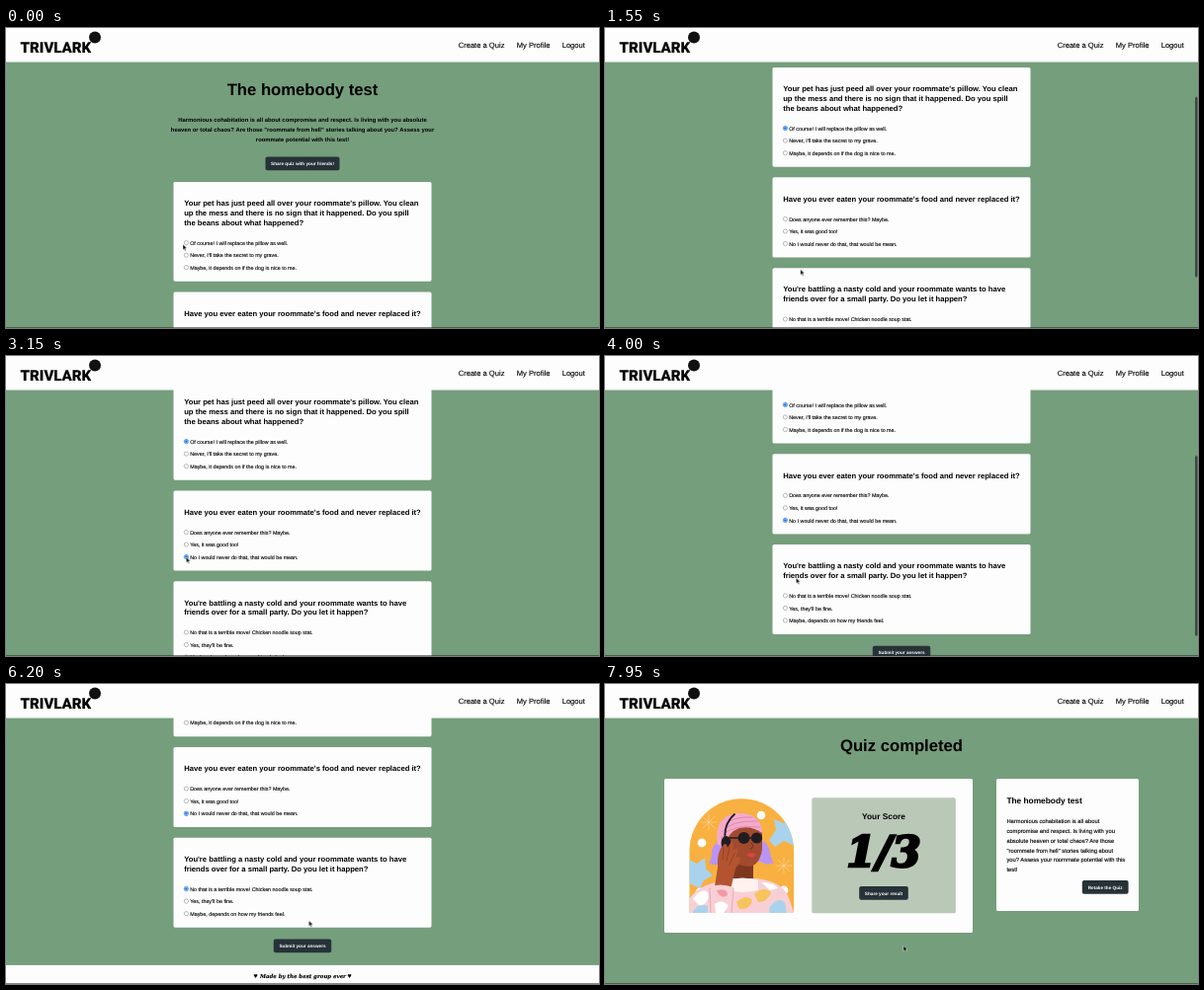
Write an HTML page that moves like this. It is 600 by 304 pixels and loops after 8 s.

```html
<!DOCTYPE html>
<html lang="en">
<head>
<meta charset="utf-8">
<title>Quiz</title>
<style>
@property --scroll { syntax: "<number>"; inherits: true; initial-value: 0; }
html, body { margin: 0; width: 100%; height: 100%; overflow: hidden; background: #759e7c; }
svg { display: block; width: 600px; height: 304px; animation: scroll 8s linear infinite; }
text { font-family: "Liberation Sans", Arial, sans-serif; text-rendering: geometricPrecision; stroke: #000; stroke-width: .12px; }
.b { font-weight: 700; stroke: none; }
.mid { text-anchor: middle; }
.fat { font-family: "DejaVu Serif", serif; font-weight: 700; font-style: italic; }
.score { stroke-width: 2.6px; }
.brand { font-family: Roboto, sans-serif; font-weight: 900; }
.page { transform: translateY(calc(var(--scroll) * -1px)); }
.thumb { transform: translateY(calc(var(--scroll) * .598px)); animation: thumb 8s linear infinite; }
.cursor { animation: cursor 8s ease-in-out infinite; }
.pick, .result { opacity: 0; animation: 8s step-end infinite; }
.pick0 { animation-name: pick0; }
.pick1 { animation-name: pick1; }
.pick2 { animation-name: pick2; }
.result { animation-name: result; }

@keyframes scroll {
  0%, 10.6% { --scroll: 0; }
  12.5% { --scroll: 14; }
  14.375% { --scroll: 35; }
  15.625% { --scroll: 51.6; }
  17.5% { --scroll: 87; }
  19.375% { --scroll: 116; }
  21.25% { --scroll: 126; }
  25%, 46.875% { --scroll: 131; }
  48.75% { --scroll: 150; }
  51.25% { --scroll: 186; }
  54.375%, 59% { --scroll: 204; }
  62%, 100% { --scroll: 203.5; }
}
@keyframes thumb {
  0%, 9.9% { opacity: 0; }
  10.6%, 30.5% { opacity: 1; }
  33%, 46.5% { opacity: 0; }
  47%, 60.5% { opacity: 1; }
  63.5%, 100% { opacity: 0; }
}
@keyframes cursor {
  0%, 4.375% { transform: translate(179px, 219.2px); }
  10.6%, 25.6% { transform: translate(197.7px, 244.6px); }
  32.5%, 41.8% { transform: translate(182.4px, 203.8px); }
  43.75%, 59% { transform: translate(193.4px, 224.8px); }
  64.5%, 69% { transform: translate(182.6px, 206.4px); }
  77.5% { transform: translate(306.5px, 239.8px); }
  82.5%, 100% { transform: translate(302px, 265.2px); }
}
@keyframes pick0 { 0% { opacity: 0; } 1.2%, 100% { opacity: 1; } }
@keyframes pick1 { 0% { opacity: 0; } 36.8%, 100% { opacity: 1; } }
@keyframes pick2 { 0% { opacity: 0; } 67.4%, 100% { opacity: 1; } }
@keyframes result { 0% { opacity: 0; } 88.1%, 100% { opacity: 1; } }
</style>
</head>
<body>
<svg viewBox="0 0 600 304"></svg>
<script>
const GREEN = '#759e7c', WHITE = '#fdfdfd', SLATE = '#263238', BLUE = '#0a74f0';

const text = (x, y, size, str, cls = '', fill = '#000') =>
  `<text x="${x}" y="${y}" font-size="${size}" class="${cls}" fill="${fill}">${str}</text>`;
const rect = (x, y, w, h, fill, r = 0) =>
  `<rect x="${x}" y="${y}" width="${w}" height="${h}" rx="${r}" fill="${fill}"/>`;
const dot = (x, y, r, fill, more = '') =>
  `<circle cx="${x}" cy="${y}" r="${r}" fill="${fill}" ${more}/>`;
const path = (d, fill, more = '') => `<path d="${d}" fill="${fill}" ${more}/>`;
const stroke = (d, color, width) =>
  path(d, 'none', `stroke="${color}" stroke-width="${width}" stroke-linecap="round"`);
const lines = (x, y, step, size, list, cls) =>
  list.map((s, i) => text(x, y + i * step, size, s, cls)).join('');
const button = (x, y, w, label) =>
  rect(x, y, w, 13.8, SLATE, 2) + text(x + w / 2, y + 8.6, 4.67, label, 'b mid', '#fff');

const radio = (y, group) =>
  dot(182.4, y, 2.1, '#fff', 'stroke="#767676" stroke-width=".5"') +
  (group === null ? '' : `<g class="pick pick${group}">` +
    dot(182.4, y, 2.1, '#fff', `stroke="${BLUE}" stroke-width=".6"`) +
    dot(182.4, y, 1.35, BLUE) + '</g>');

function card(group, top, question, options, picked) {
  const first = top + 21.6 + (question.length - 1) * 9.75 + 20.5;
  const bottom = first + (options.length - 1) * 12.55 + 14;
  return rect(169.5, top, 261, bottom - top, WHITE, 1.6) +
    lines(180.2, top + 24.3, 9.75, 7.65, question, 'b') +
    options.map((label, i) => {
      const y = first + i * 12.55;
      return radio(y, i === picked ? group : null) + text(186.2, y + 2.1, 5.36, label);
    }).join('');
}

const quiz = `<g class="page">
  ${text(300, 67.8, 16.67, 'The homebody test', 'b mid')}
  ${lines(300, 95.4, 9.7, 5.9, [
    'Harmonious cohabitation is all about compromise and respect. Is living with you absolute',
    'heaven or total chaos? Are those "roommate from hell" stories talking about you? Assess your',
    'roommate potential with this test!'], 'b mid')}
  ${button(262.5, 130.4, 75, 'Share quiz with your friends!')}
  ${card(0, 156, [
    "Your pet has just peed all over your roommate's pillow. You clean",
    'up the mess and there is no sign that it happened. Do you spill',
    'the beans about what happened?'], [
    'Of course! I will replace the pillow as well.',
    "Never, I'll take the secret to my grave.",
    'Maybe, it depends on if the dog is nice to me.'], 0)}
  ${card(1, 267.4, ["Have you ever eaten your roommate's food and never replaced it?"], [
    'Does anyone ever remember this? Maybe.',
    'Yes, it was good too!',
    'No I would never do that, that would be mean.'], 2)}
  ${card(2, 359.2, [
    "You're battling a nasty cold and your roommate wants to have",
    'friends over for a small party. Do you let it happen?'], [
    'No that is a terrible move! Chicken noodle soup stat.',
    "Yes, they'll be fine.",
    'Maybe, depends on how my friends feel.'], 0)}
  ${button(270.8, 462, 58.4, 'Submit your answers')}
  ${rect(0, 488.4, 600, 30, WHITE)}
  ${text(300.5, 501, 5.45, 'Made by the best group ever', 'fat mid')}
  ${text(252.7, 501, 7, '♥', 'mid')}${text(347.7, 501, 7, '♥', 'mid')}
</g>`;

const sparkle = (x, y, r) => [0, 1, 2, 3].map(i => {
  const a = i * Math.PI / 4, dx = r * Math.cos(a), dy = r * Math.sin(a);
  return stroke(`M${x - dx} ${y - dy}L${x + dx} ${y + dy}`, '#fbe3b5', .5);
}).join('');

const portrait = `<clipPath id="arch"><path d="M85.5 232V169A52.7 52.7 0 0 1 191 169V232Z"/></clipPath>
<g clip-path="url(#arch)">
  ${rect(85, 115, 107, 118, '#f8b040')}
  ${path('M166 158L173 148L171 137L181 141L192 132V164L181 159L172 165Z', '#a9d3ec')}
  ${path('M85 178L93 182L101 176L102 187L109 194L100 199L96 207L85 202Z', '#a9d3ec')}
  ${sparkle(105, 140, 8)}${sparkle(181, 184, 8)}
  ${dot(98, 161, 4.4, '#fff')}${dot(158, 133, 4.3, '#fff')}${dot(181, 209, 4.4, '#fff')}${dot(96, 211, 4.4, '#fff')}
  ${path('M114 160C104 168 111 174 105 181C113 186 121 181 127 184L158 180C164 185 168 181 171 182C166 174 168 164 160 159Z', '#b994f4')}
  ${path('M128 172H150V207H128Z', '#803720')}
  ${path('M123 148Q141 137 159 148V168Q156 184 146 185Q128 184 124 169Z', '#a14a2e')}
  ${path('M114 163C110 140 122 131 136 131C151 130 160 141 159 151Q148 143 136 146Q124 150 122 164Z', '#f4aacb')}
  ${['M118 150Q127 138 154 139', 'M117 157Q123 142 157 145', 'M122 142Q130 134 149 135'].map(d => stroke(d, '#d981ac', .8)).join('')}
  ${stroke('M122 160Q119 143 131 132', '#211c22', 1.8)}
  <ellipse cx="122.5" cy="161" rx="5" ry="7" fill="#211c22"/>
  ${stroke('M126 156H158', '#211c22', 1.3)}
  ${dot(140.5, 156, 6, '#211c22')}${dot(153.5, 156, 5.6, '#211c22')}
  ${stroke('M148 161Q152 166 147 167', '#632b1e', .8)}
  ${path('M143 173Q148 169 153 173Q148 178 143 173Z', '#d84545')}
  ${path('M85 234V218Q92 207 108 202L127 197H153Q178 200 185 214L192 234Z', '#f9cfd6')}
  ${path('M124 199Q139 194 155 199V209Q139 213 124 209Z', '#fff2ee')}
  ${path('M89 218Q97 206 104 211Q107 221 96 225Z', '#fff')}
  ${path('M151 213Q161 204 168 211Q165 221 155 221Z', '#f6c45d')}
  ${path('M166 227Q174 215 182 221L184 234H167Z', '#a9d3ec')}
  ${path('M133 221Q143 212 149 219Q147 229 136 228Z', '#f6c45d')}
  ${path('M88 233Q93 221 104 225V234Z', '#a9d3ec')}
  ${path('M158 201Q170 200 175 207L167 209Z', '#fff')}
  ${path('M110 211L114 186Q113 169 120 163Q123 160 124 166L128 159Q131 160 129 169L133 166Q136 168 132 176L136 175Q139 178 132 187L126 213Z', '#b4532f')}
  ${stroke('M120 166L119 178M126 166L123 179M131 172L126 183', '#7d3521', .6)}
  ${path('M105 206Q116 201 130 206L128 232H107Z', '#f9cfd6')}
  ${path('M113 209Q124 206 124 214Q117 219 113 209Z', '#f29aa8')}
  ${path('M111 223Q119 217 125 225L120 232H112Z', '#fff')}
  ${stroke('M106 207L107 232M130 207L128 232', '#d98fa2', .6)}
</g>`;

const result = `<g class="result">
  ${rect(0, 34, 600, 270, GREEN)}
  ${text(300, 67.6, 16.67, 'Quiz completed', 'b mid')}
  ${rect(60, 96, 312, 156, WHITE, 1.6)}
  ${portrait}
  ${rect(209.3, 115.3, 145.6, 117, '#bac9b7', 1.6)}
  ${text(282, 136.6, 8.33, 'Your Score', 'b mid')}
  ${text(282, 185, 43, '1/3', 'fat mid score')}
  ${button(257.2, 205, 49.6, 'Share your result')}
  ${rect(396, 96, 144, 134, WHITE, 1.6)}
  ${text(406.4, 120.6, 8.33, 'The homebody test', 'b')}
  ${lines(406.4, 141.4, 9.7, 5.83, [
    'Harmonious cohabitation is all about',
    'compromise and respect. Is living with you',
    'absolute heaven or total chaos? Are those',
    '"roommate from hell" stories talking about',
    'you? Assess your roommate potential with this',
    'test!'])}
  ${button(482.8, 199, 46.8, 'Retake the Quiz')}
</g>`;

const header = rect(0, 0, 600, 34.5, WHITE) +
  text(14.6, 25.4, 15, 'TRIVLARK', 'brand') +
  dot(90, 9.5, 6, '#111') +
  text(457.7, 19.8, 7.58, 'Create a Quiz') +
  text(516.8, 19.8, 7.58, 'My Profile') +
  text(562.7, 19.8, 7.58, 'Logout');

document.querySelector('svg').innerHTML =
  rect(0, 0, 600, 304, GREEN) + quiz + result + header +
  `<g class="thumb">${rect(597, .5, 2.6, 182.5, '#3d4842', 1.3)}</g>` +
  rect(0, 303, 600, 1, 'rgba(35,45,42,.55)') +
  `<g class="cursor">${path('M0 0V5.6L1.3 4.4L2.2 6.4L3.2 6L2.3 4H4.1Z', '#000', 'stroke="#fff" stroke-width=".45"')}</g>`;
</script>
</body>
</html>
```
